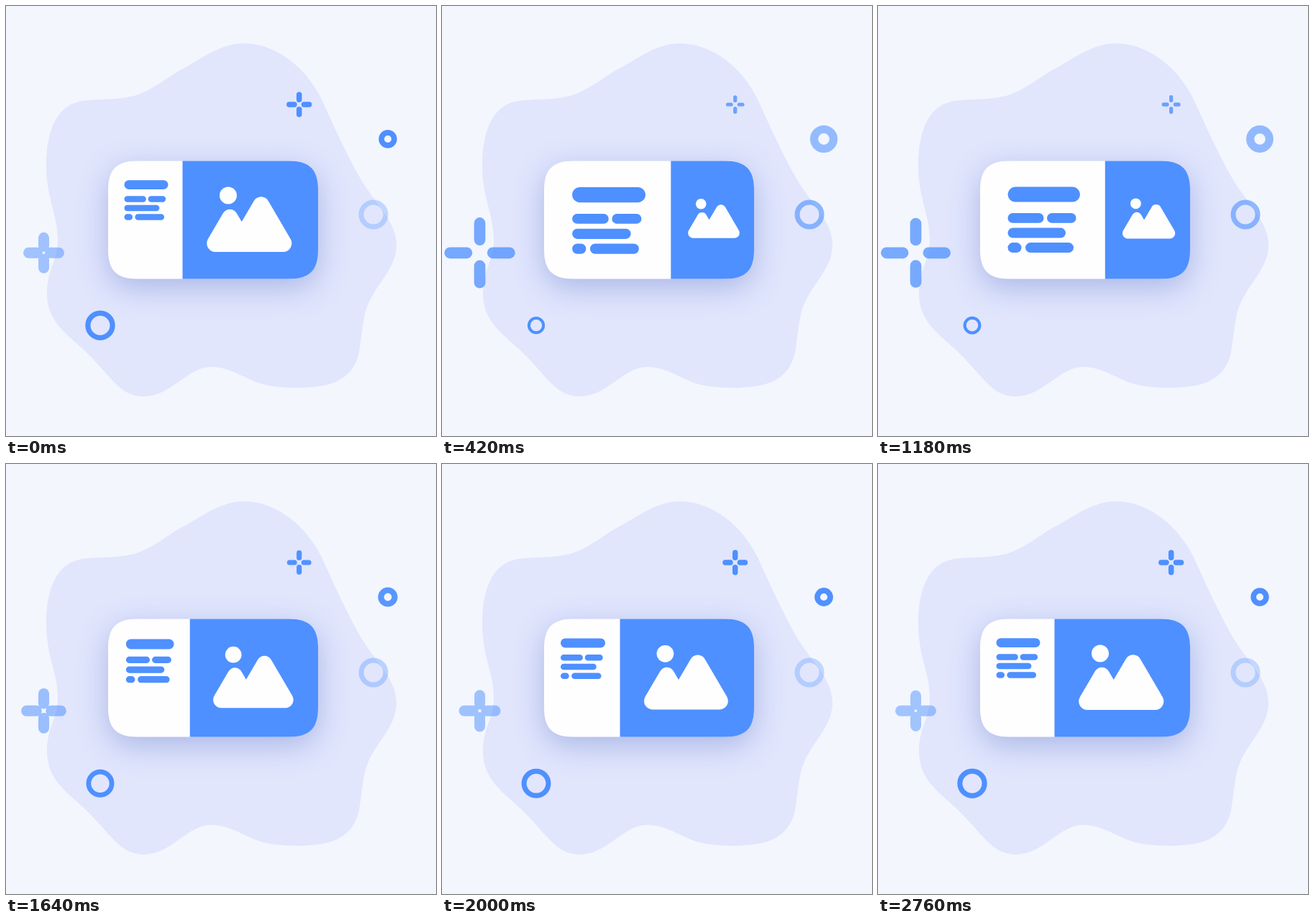
These frames come from a looping animation (598x598 px, 2880 ms). An HTML page with a canvas:

```html
<!DOCTYPE html>
<html lang="en">
<head>
<meta charset="utf-8">
<title>Card layout</title>
<style>
html, body { margin: 0; width: 100%; height: 100%; overflow: hidden; background: #f3f6fd; }
canvas { display: block; width: 598px; height: 598px; }
</style>
</head>
<body>
<canvas id="stage" width="598" height="598"></canvas>
<script>
const ctx = document.getElementById('stage').getContext('2d');
const BLUE = '#4e90ff', WHITE = '#fffeff';
const LOOP = 2880, FPS = 33;

const blob = new Path2D(`M331 52C300 52 277 70 250 85C225 98 205 117 178 125
  C145 133 118 127 95 135C66 146 56 182 56 222C56 268 72 290 72 325
  C72 355 57 365 57 400C57 445 95 462 122 492C150 522 162 543 192 543
  C230 543 252 502 285 502C318 502 335 524 372 529C400 532 420 531 435 529
  C475 524 489 500 492 475C497 445 496 425 510 402C524 378 543 360 543 332
  C543 300 515 276 496 245C476 212 455 165 440 132C418 85 375 52 331 52Z`);

// Rounded card with soft, squircle-like corners
function cardPath(l, t, r, b, c, k) {
  const p = new Path2D();
  p.moveTo(l + c, t);
  p.lineTo(r - c, t);
  p.bezierCurveTo(r - k, t, r, t + k, r, t + c);
  p.lineTo(r, b - c);
  p.bezierCurveTo(r, b - k, r - k, b, r - c, b);
  p.lineTo(l + c, b);
  p.bezierCurveTo(l + k, b, l, b - k, l, b - c);
  p.lineTo(l, t + c);
  p.bezierCurveTo(l, t + k, l + k, t, l + c, t);
  p.closePath();
  return p;
}
const card = cardPath(142, 215.5, 434, 379.5, 40, 12);

// Text bars: x, y, width, height
const bars = [
  [0, 0, 100.5, 21],
  [0, 36.5, 50, 13.7], [54.5, 36.5, 40.5, 13.7],
  [0, 57, 80.5, 14],
  [0, 77.5, 19, 14], [24.5, 77.5, 67, 14]
];

const mix = (a, b, p) => a + (b - a) * p;

// Straight move from 0 to 1, then a decaying overshoot
function spring(s) {
  const end = 0.0942, amp = 0.684, decay = 5.7, w = 20.1;
  const start = end - 1 / (amp * w);
  if (s <= start) return 0;
  if (s < end) return (s - start) / (end - start);
  const u = s - end;
  return 1 + amp * Math.exp(-decay * u) * Math.sin(w * u);
}

const BACK = 1.352;
const pose = s => s < BACK ? spring(s) : 1 - spring(s - BACK);

function ring(x, y, outer, inner, alpha) {
  ctx.globalAlpha = alpha;
  ctx.lineWidth = outer - inner;
  ctx.strokeStyle = BLUE;
  ctx.beginPath();
  ctx.arc(x, y, (outer + inner) / 2, 0, Math.PI * 2);
  ctx.stroke();
  ctx.globalAlpha = 1;
}

function plus(x, y, outer, inner, width, alpha) {
  const len = outer - inner, h = width / 2;
  ctx.globalAlpha = alpha;
  ctx.fillStyle = BLUE;
  ctx.beginPath();
  ctx.roundRect(x + inner, y - h, len, width, h);
  ctx.roundRect(x - outer, y - h, len, width, h);
  ctx.roundRect(x - h, y + inner, width, len, h);
  ctx.roundRect(x - h, y - outer, width, len, h);
  ctx.fill();
  ctx.globalAlpha = 1;
}

function textBlock(p) {
  const k = mix(0.607, 1, p);
  ctx.save();
  ctx.translate(mix(164.5, 180.5, p), mix(242.2, 251.6, p));
  ctx.scale(k, k);
  ctx.fillStyle = BLUE;
  ctx.beginPath();
  for (const [x, y, w, h] of bars) ctx.roundRect(x, y, w, h, h / 2);
  ctx.fill();
  ctx.restore();
}

function picture(p) {
  const k = mix(1, 0.62, p);
  ctx.save();
  ctx.translate(mix(338.3, 376.6, p), mix(342, 323.5, p));
  ctx.scale(k, k);
  ctx.fillStyle = WHITE;
  ctx.beginPath();
  ctx.arc(-29.3, -78.5, 12, 0, Math.PI * 2);
  ctx.fill();
  ctx.beginPath();
  ctx.moveTo(0, 0);
  ctx.arcTo(-68, 0, -27, -70, 12);
  ctx.arcTo(-27, -70, -10.5, -42, 11);
  ctx.lineTo(-10.5, -42);
  ctx.arcTo(16.5, -88, 68, 0, 11.5);
  ctx.arcTo(68, 0, 0, 0, 12);
  ctx.closePath();
  ctx.fill();
  ctx.restore();
}

function draw(p) {
  ctx.fillStyle = '#f3f6fd';
  ctx.fillRect(0, 0, 598, 598);
  ctx.fillStyle = '#e1e6fd';
  ctx.fill(blob);

  ctx.save();
  ctx.shadowColor = 'rgba(70, 95, 190, 0.35)';
  ctx.shadowBlur = 42;
  ctx.shadowOffsetY = 12;
  ctx.fillStyle = WHITE;
  ctx.fill(card);
  ctx.restore();

  ctx.save();
  ctx.clip(card);
  ctx.fillStyle = BLUE;
  ctx.fillRect(mix(245.5, 315.8, p), 210, 240, 175);
  ctx.restore();

  textBlock(p);
  picture(p);

  plus(407.7, 137, mix(17.6, 13, p), 3, mix(7.5, 5.3, p), Math.min(1, mix(1, 0.8, p)));
  plus(52.5, 343.3, mix(28.5, 48.5, p), Math.max(0, mix(1.5, 10, p)), mix(15, 15.7, p), mix(0.5, 0.75, p));
  ring(531, 185, mix(12.7, 18.9, p), mix(5, 7.8, p), Math.min(1, mix(1, 0.59, p)));
  ring(511, 290, 20.5, 13.5, mix(0.3, 0.6, p));
  ring(131, 444.2, mix(20.7, 12.4, p), mix(13.5, 8.3, p), 1);
}

const t0 = performance.now();
function tick() {
  const t = (performance.now() - t0) % LOOP;
  const step = Math.floor((Math.floor(t / 10) * 10 + 5) * FPS / 1000);
  draw(pose(step / FPS));
  requestAnimationFrame(tick);
}
tick();
</script>
</body>
</html>
```
